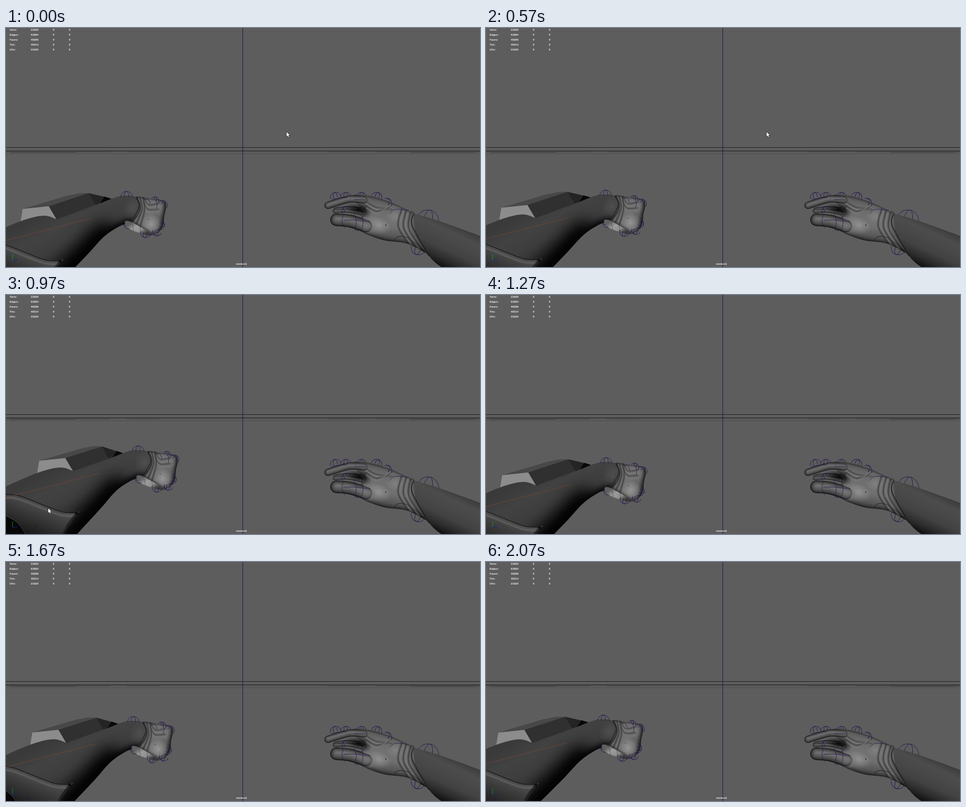
An HTML page with a canvas that plays this animation: 1054x531 px, repeating every 2.1 s.

```html
<!DOCTYPE html>
<html lang="en">
<head>
<meta charset="utf-8">
<title>camera1</title>
<style>
html, body { margin: 0; width: 100%; height: 100%; overflow: hidden; background: #5d5d5d; }
canvas { display: block; }
</style>
</head>
<body>
<canvas id="stage" width="1054" height="531"></canvas>
<script>
const W = 1054, H = 531, LOOP = 2100, CYCLE = 625;
const WIRE = '#25104f', TAU = Math.PI * 2;
const view = document.getElementById('stage').getContext('2d');
const still = document.createElement('canvas');
still.width = W;
still.height = H;

let g = view;
const fixed = (x, y) => [x, y];
let warp = fixed;

const clamp = v => Math.min(1, Math.max(0, v));
const mix = (a, b, k) => a + (b - a) * k;
const mixAll = (a, b, k) => a.map((v, i) => mix(v, b[i], k));
const grey = v => `rgb(${v},${v},${v})`;

// Swing of the hand: phase in ms, offset x, offset y.
const SWING = [[0, -33, 29], [195, -40, 6], [250, -7, 0], [300, 6, -1], [345, -7, 1], [570, -35, 26]];

function keyAt(i) {
  const n = SWING.length, turn = Math.floor(i / n), [t, x, y] = SWING[i - turn * n];
  return [t + turn * CYCLE, x, y];
}

function handAt(phase) {
  let i = SWING.length - 1;
  while (SWING[i][0] > phase) i--;
  const [a, b, c, d] = [i - 1, i, i + 1, i + 2].map(keyAt);
  const span = c[0] - b[0], u = (phase - b[0]) / span, u2 = u * u, u3 = u2 * u;
  return [1, 2].map(j => {
    const m0 = (c[j] - a[j]) / (c[0] - a[0]) * span;
    const m1 = (d[j] - b[j]) / (d[0] - b[0]) * span;
    return (2 * u3 - 3 * u2 + 1) * b[j] + (u3 - 2 * u2 + u) * m0 +
           (3 * u2 - 2 * u3) * c[j] + (u3 - u2) * m1;
  });
}

// The elbow swings wider than the hand; the forearm blends the two.
function armWarp([hx, hy]) {
  const ex = hx * 1.42, ey = hy * 1.05 - hx * 0.17;
  return (x, y) => {
    const k = clamp((x - 165) / 95);
    return [x + mix(ex, hx, k), y + mix(ey, hy, k)];
  };
}

const pairs = list => list.flatMap((x, i) => i % 2 ? [] : [warp(x, list[i + 1])]);

// Smooth curve through the points; a doubled point makes a corner.
function curve(list, closed) {
  const p = pairs(list), n = p.length;
  const at = i => closed ? p[(i + n) % n] : p[Math.min(n - 1, Math.max(0, i))];
  const path = new Path2D();
  path.moveTo(...p[0]);
  for (let i = 0; i < (closed ? n : n - 1); i++) {
    const [a, b, c, d] = [at(i - 1), at(i), at(i + 1), at(i + 2)];
    path.bezierCurveTo(b[0] + (c[0] - a[0]) / 6, b[1] + (c[1] - a[1]) / 6,
      c[0] - (d[0] - b[0]) / 6, c[1] - (d[1] - b[1]) / 6, c[0], c[1]);
  }
  if (closed) path.closePath();
  return path;
}

function poly(list, shade) {
  g.beginPath();
  pairs(list).forEach(p => g.lineTo(...p));
  g.closePath();
  g.fillStyle = grey(shade);
  g.fill();
}

// Linear gradient with evenly spaced greys.
function ramp(from, to, ...shades) {
  const grad = g.createLinearGradient(...warp(...from), ...warp(...to));
  shades.forEach((s, i) => grad.addColorStop(i / (shades.length - 1), grey(s)));
  return grad;
}

function strokePath(path, color, width, blur = 0) {
  g.save();
  if (blur) g.filter = `blur(${blur}px)`;
  g.strokeStyle = color;
  g.lineWidth = width;
  g.lineCap = g.lineJoin = 'round';
  g.stroke(path);
  g.restore();
}
const stroke = (list, color, width = 1, blur = 0) => strokePath(curve(list), color, width, blur);
const wire = (...list) => stroke(list, WIRE, 0.9);

function glow(x, y, rx, ry, shade, alpha, turn = 0) {
  g.save();
  g.translate(...warp(x, y));
  g.rotate(turn);
  g.scale(rx, ry);
  const grad = g.createRadialGradient(0, 0, 0, 0, 0, 1);
  for (const stop of [0, 1])
    grad.addColorStop(stop, `rgba(${shade},${shade},${shade},${alpha * (1 - stop)})`);
  g.fillStyle = grad;
  g.fillRect(-1, -1, 2, 2);
  g.restore();
}

// Filled form; shading stays inside and the rim darkens.
function form(list, fill, shade, rim = 0) {
  const path = curve(list, true);
  g.save();
  g.fillStyle = fill;
  g.fill(path);
  g.clip(path);
  if (shade) shade();
  if (rim) strokePath(path, `rgba(0,0,0,${rim})`, 5, 2);
  g.restore();
}

// Rounded limb: ever narrower, lighter strokes.
function tube(list, width, peak) {
  const path = curve(list), layers = 9;
  g.save();
  for (let i = 0; i < layers; i++) {
    const k = i / layers;
    strokePath(path, grey(Math.round(mix(20, peak, Math.sqrt(k)))), width * (1 - k));
    g.translate(0, -width * 0.012);
  }
  g.restore();
}

// Creases spread between two curves, dark and light in turn.
function folds(a, b, count, width, dark = 58, light = 122) {
  for (let i = 0; i < count; i++)
    stroke(mixAll(a, b, i / (count - 1)), grey(i % 2 ? light : dark), width, width * 0.4);
}

// Rig handle: an arc with a narrow crossing arc.
function ring(x, y, r, turn = 0, sweep = Math.PI) {
  g.save();
  g.translate(...warp(x, y));
  g.rotate(turn);
  g.strokeStyle = WIRE;
  g.lineWidth = 0.9;
  for (const rx of [r, r * 0.4]) {
    g.beginPath();
    g.ellipse(0, 0, rx, r, 0, -sweep, 0);
    g.stroke();
  }
  g.restore();
}

function rule(x0, x1, y, shade, h = 1) {
  g.fillStyle = grey(shade);
  g.fillRect(x0, y, x1 - x0, h);
}

function drawGrid() {
  rule(0, W, 0, 93, H);
  rule(0, W, 265, 24);
  rule(0, W, 272, 55, 2);
  rule(0, W, 274, 80);
  rule(0, W, 279, 74);
  for (const [a, b, y] of [[0, 232, 275], [10, 155, 276], [268, 340, 275]]) {
    rule(a, b, y, 66);
    rule(W - b, W - a, y, 66);
  }
  g.fillStyle = '#25084a';
  g.fillRect(526, 0, 1, H);
}

function drawText() {
  g.font = 'bold 6px "Liberation Sans", Arial, sans-serif';
  g.fillStyle = '#f2f2f2';
  const stats = { Verts: 21600, Edges: 61864, Faces: 40296, Tris: 40314, UVs: 21620 };
  Object.entries(stats).forEach(([name, count], i) => {
    const y = 6 + i * 11;
    g.textAlign = 'left';
    g.fillText(name + ':', 8, y);
    g.textAlign = 'right';
    [count, 0, 0].forEach((n, col) => g.fillText(n, 72 + col * 35.5, y));
  });
  g.textAlign = 'left';
  g.fillText('camera1', 511.5, 526);
}

function drawRightHand() {
  for (const x of [733, 756, 790, 824]) ring(x, 377, 12, (x - 770) / 150);
  ring(938, 428, 24, 0.2);
  ring(917, 488, 16, 3.5);

  // forearm
  form([905, 411, 905, 411, 975, 433, 1060, 464, 1060, 464, 1060, 580, 1060, 580, 968, 531, 938, 503, 938, 503, 914, 468],
    ramp([1000, 436], [958, 528], 58, 76, 72, 66, 44, 12));

  // rear fingers, then the dark gap below the index finger
  tube([733, 404, 760, 401, 795, 404], 10, 90);
  tube([731, 407, 760, 406, 790, 412], 8, 100);
  glow(785, 403, 32, 12, 0, 0.9, 0.2);

  form([772, 371, 812, 374, 858, 388, 905, 410, 905, 410, 905, 446, 937, 502, 937, 502, 892, 479, 838, 471, 787, 450, 784, 428, 798, 408, 778, 388],
    ramp([840, 375], [822, 476], 82, 104, 112, 112, 88, 30),
    () => {
      glow(826, 439, 32, 20, 185, 0.5, 0.25);
      glow(866, 418, 22, 18, 160, 0.35);
      glow(794, 404, 22, 17, 0, 0.8, 0.6);
      folds([796, 383, 822, 398, 858, 403], [802, 400, 825, 412, 850, 396], 4, 2.2);
      folds([880, 402, 872, 440, 894, 478], [904, 412, 902, 448, 936, 500], 6, 2.4, 50, 118);
      stroke([865, 476, 868, 465, 890, 465, 920, 486], '#2c2c2c', 1.3, 0.5);
    }, 0.45);
  stroke([907, 413, 903, 438, 938, 502], '#141414', 1.4);

  // index finger and thumb, blended into the palm
  tube([716, 394, 738, 387, 765, 380, 796, 382], 16, 112);
  tube([735, 426, 765, 429, 800, 440], 28, 116);
  glow(806, 439, 26, 18, 116, 0.9, 0.4);
  glow(797, 381, 20, 9, 96, 0.8, 0.2);

  wire(724, 381, 740, 378, 758, 377);
  wire(775, 381, 798, 382);
  wire(750, 416, 747, 429, 753, 444);
  wire(774, 414, 779, 430, 776, 448, 790, 447, 794, 428, 790, 415);
  wire(750, 427, 778, 427, 809, 431);
  wire(853, 412, 865, 403, 895, 405);
  ring(757, 406, 10, -0.6);
  ring(846, 390, 12, 0.5, 2.4);
  rule(843, 846, 437, 20);
  rule(844, 845, 438, 20, 2);
  rule(849, 851, 392, 20);
}

function drawBox() {
  poly([84, 366, 180, 338, 205, 334, 222, 335, 142, 361], 72);
  poly([142, 360, 222, 335, 240, 366, 160, 395], 48);
  poly([222, 335, 254, 346, 246, 366, 238, 366], 36);
  poly([253, 345, 267, 350, 256, 362, 242, 364], 8);
  poly([84, 366, 142, 360, 162, 394, 130, 400, 79, 396], 140);
}

function drawForearm() {
  const under = [311, 401, 284, 412, 252, 434, 221, 470, 194, 500, 165, 532, 112, 590];
  const rim = [-50, 441, 0, 441, 40, 444, 105, 469, 137, 480, 169, 482];
  form([-60, 452, 0, 427, 80, 393, 130, 381, 160, 389, 160, 389, 240, 361, 290, 344, 331, 351, 329, 380, ...under, -60, 620],
    ramp([150, 372], [196, 472], 58, 66, 62, 50),
    () => {
      stroke(under.slice(4), '#000', 62, 17);
      stroke(under, '#050505', 14, 6);
      glow(316, 372, 24, 30, 95, 0.5, 0.3);

      // sleeve opening
      form([...rim, 169, 482, 138, 532, 115, 590, 115, 590, -60, 620],
        ramp([85, 455], [55, 530], 78, 66, 52, 38, 22),
        () => {
          stroke(rim.map((v, i) => i % 2 ? v + 7 : v - 3), '#666', 3, 1.5);
          stroke([166, 485, 150, 506, 133, 540], '#151515', 4, 1.5);
        });
      stroke(rim, '#191919', 1.6);
      const lining = [-60, 472, -20, 478, 36, 504, 68, 560];
      form([...lining, 68, 600, -60, 620], grey(7));
      stroke(lining, '#4b4b4b');
      wire(62, 531, 70, 522, 79, 512, 72, 513);
      glow(167, 483, 5, 4, 0, 0.9);
    });
}

function drawLeftHand() {
  ring(301, 347, 13);
  ring(304, 408, 9, -1.5, 4);

  // folded fingers
  form([298, 406, 306, 400, 355, 421, 364, 428, 350, 432, 313, 420],
    ramp([315, 402], [336, 432], 95, 155, 145, 60));
  for (const x of [313, 330]) stroke([x, x / 3 + 298, x + 4, x / 3 + 317], '#555');

  form([322, 346, 350, 349, 378, 353, 389, 364, 385, 389, 383, 407, 376, 421, 362, 429, 346, 421, 311, 401, 311, 401, 326, 384, 330, 364],
    ramp([328, 368], [392, 382], 92, 112, 112, 98, 26),
    () => {
      glow(357, 407, 22, 22, 185, 0.5, 0.4);
      glow(374, 371, 12, 18, 165, 0.25);
      folds([338, 346, 350, 364, 374, 360], [337, 360, 348, 379, 372, 380], 4, 2);
      folds([324, 347, 331, 372, 314, 402], [338, 348, 341, 376, 332, 410], 5, 2, 45, 118);
    }, 0.5);
  stroke([322, 347, 329, 368, 311, 402], '#1b1b1b', 1.2);

  wire(340, 353, 349, 352, 354, 362);
  wire(362, 350, 369, 360, 368, 371);
  ring(364, 355, 9, 0.2, 2.6);
  ring(381, 365, 11, 0.6);
  ring(375, 408, 11, 1.8);
  ring(369, 423, 10, 3.5);
  ring(343, 426, 11, 3.4);
  wire(355, 429, 361, 423, 374, 417);
  const [x, y] = warp(350, 396);
  rule(x - 1, x + 1, y, 22);
}

function drawAim([hx, hy]) {
  const x = 211 + hx * 0.76, y = 396 + hy * 0.96;
  g.strokeStyle = '#7b4632';
  g.lineWidth = 0.9;
  g.beginPath();
  g.moveTo(x, y);
  g.lineTo(x - 220, y + 57);
  g.stroke();
}

function drawAxis() {
  g.fillStyle = '#00a51c';
  g.fillRect(14, 507, 1, 9);
  g.fillRect(13, 504, 1, 2);
  g.fillRect(15, 504, 1, 2);
  g.fillStyle = '#1717b4';
  g.fillRect(14, 516, 6, 1);
  g.fillRect(21, 514, 3, 1);
  g.fillRect(21, 516, 3, 1);
}

// Rests, glides to the lower left and leaves the stage.
function drawCursor(t) {
  if (t > 1060) return;
  const u = clamp((t - 600) / 340), ease = u * u * (3 - 2 * u), exit = clamp((t - 985) / 75);
  const x = 624 - 530 * ease - 45 * exit, y = 231 + 243 * ease + 60 * exit;
  const tip = [[0, 0], [0, 10], [2.3, 8], [4, 11.5], [5.5, 10.8], [4, 7.3], [7, 7]];
  g.beginPath();
  tip.forEach(([dx, dy]) => g.lineTo(x + dx, y + dy));
  g.closePath();
  g.strokeStyle = '#111';
  g.lineWidth = 1.2;
  g.stroke();
  g.fillStyle = '#fff';
  g.fill();
}

function frame(now) {
  const t = now % LOOP, hand = handAt(t % CYCLE);
  g.drawImage(still, 0, 0);
  warp = armWarp(hand);
  drawBox();
  drawForearm();
  drawLeftHand();
  warp = fixed;
  drawAim(hand);
  drawAxis();
  drawCursor(t);
  requestAnimationFrame(() => frame(performance.now() - start));
}

g = still.getContext('2d');
drawGrid();
drawRightHand();
drawText();
g = view;
const start = performance.now();
frame(0);
</script>
</body>
</html>
```
